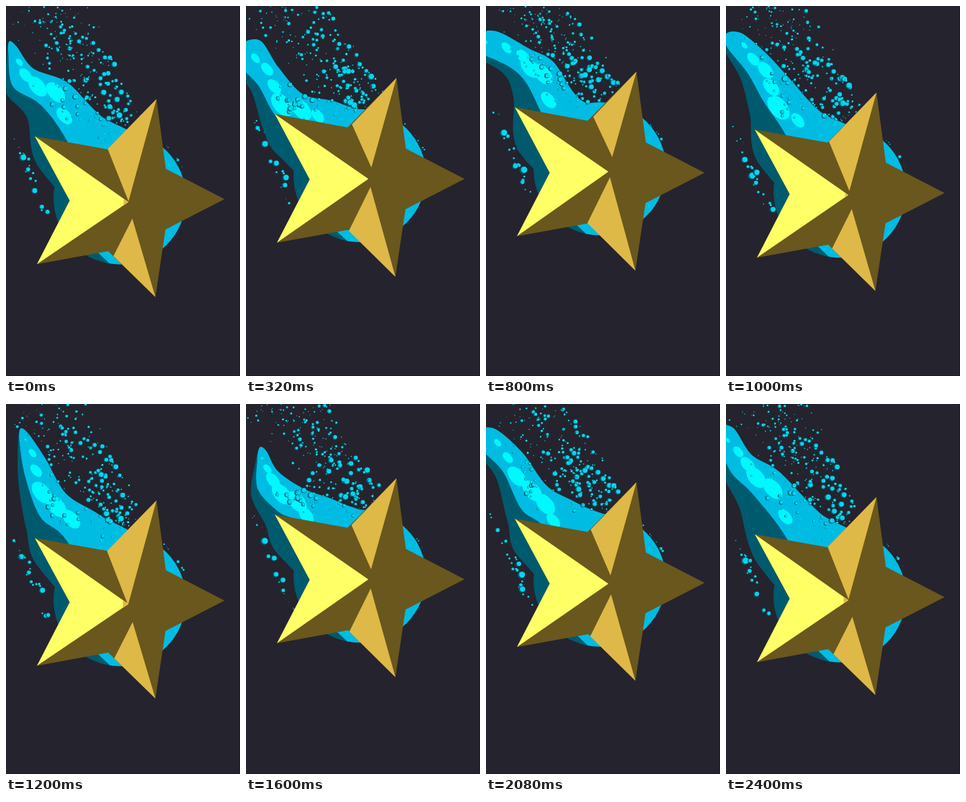
Animation of 325 by 512 pixels, one loop 2440 ms. Source, as an HTML page with a canvas:

```html
<!DOCTYPE html>
<html>
<head>
<meta charset="utf-8">
<style>
html, body { margin: 0; width: 100%; height: 100%; overflow: hidden; background: #25232e; }
canvas { display: block; width: 325px; height: 512px; }
</style>
</head>
<body>
<canvas id="stage" width="325" height="512"></canvas>
<script>
const ctx = document.getElementById('stage').getContext('2d');
const LOOP = 2440, STEP = 40;
const BG = '#25232e', DEEP = '#005a6e', WATER = '#00bce3', GLOW = '#00f8ff';
const DARK = '#69571d', TAN = '#dfb947', YELLOW = '#ffff66';

const lerp = (a, b, u) => a + (b - a) * u;
const bump = u => Math.sin(Math.PI * u);

let seed = 7;
function rnd() {
  seed = (seed * 16807) % 2147483647;
  return seed / 2147483647;
}

// Star height: half cosines between the turning points [time, y].
const turns = [[-20, 267.4], [610, 217.5], [1190, 272], [1800, 233], [2420, 267.4], [3050, 217.5]];
function bob(t) {
  const i = turns.findIndex(p => p[0] > t);
  const [t0, a] = turns[i - 1], [t1, b] = turns[i];
  return lerp(a, b, (1 - Math.cos(Math.PI * (t - t0) / (t1 - t0))) / 2);
}

// Centre line of the water tail: bend, neck and tip, and the half width of the tip.
const sways = [
  { time: 0, line: [57, 130, 19, 103, 8, 62], tip: 9 },
  { time: 320, line: [52, 147, 26, 101, 0, 65], tip: 26 },
  { time: 800, line: [66, 102, 42, 76, -4, 50], tip: 23 },
  { time: 1200, line: [56, 149, 36, 92, 24, 48], tip: 10 },
  { time: 1600, line: [55, 143, 26, 110, 21, 72], tip: 10 },
  { time: 2080, line: [58, 139, 32, 84, -2, 48], tip: 20 },
  { time: 2400, line: [46, 118, 17, 87, -2, 45], tip: 17 }
];
const ACROSS = { x: .75, y: -.66 };
const FLOW_ANGLE = .85;
const SHADE = [.05, .3, .5, .7];

function tailSpine(t, y) {
  const i = sways.findLastIndex(s => s.time <= t);
  const a = sways[i], b = sways[(i + 1) % sways.length];
  const u = (t - a.time) / ((b.time || LOOP) - a.time);
  const [x1, y1, x2, y2, x3, y3] = a.line.map((v, k) => lerp(v, b.line[k], u));
  return [
    { x: 89, y: 178 + .6 * (y - 250), w: 56 },
    { x: x1, y: y1, w: 37 },
    { x: x2, y: y2, w: 25 },
    { x: x3, y: y3, w: lerp(a.tip, b.tip, u) }
  ];
}

// Point s stations up the spine, pushed aside by a share of the width there.
function onSpine(spine, s, aside) {
  const i = Math.min(Math.floor(s), spine.length - 2), u = s - i;
  const mix = key => lerp(spine[i][key], spine[i + 1][key], u);
  const w = mix('w');
  return { x: mix('x') + ACROSS.x * w * aside, y: mix('y') + ACROSS.y * w * aside, w };
}

// Closed smooth curve through points.
function smooth(points) {
  const n = points.length, path = new Path2D(), at = i => points[(i + n) % n];
  path.moveTo(points[0].x, points[0].y);
  for (let i = 0; i < n; i++) {
    const near = k => at(i)[k] + (at(i + 1)[k] - at(i - 1)[k]) / 6.5;
    const far = k => at(i + 1)[k] - (at(i + 2)[k] - at(i)[k]) / 6.5;
    path.bezierCurveTo(near('x'), near('y'), far('x'), far('y'), at(i + 1).x, at(i + 1).y);
  }
  return path;
}

function tailShape(spine, y, lowerShare) {
  const [, , neck, end] = spine;
  const upper = spine.map((p, i) => onSpine(spine, i, 1));
  const lower = spine.map((p, i) => onSpine(spine, i, -lowerShare(i)));
  const tip = { x: lerp(neck.x, end.x, 1.32), y: lerp(neck.y, end.y, 1.32) };
  return smooth([...upper.reverse(), { x: 200, y: y - 66 }, { x: 150, y: y + 50 }, ...lower, tip]);
}

function circle(x, y, r, color) {
  ctx.fillStyle = color;
  ctx.beginPath();
  ctx.arc(x, y, r, 0, 7);
  ctx.fill();
}

function trace(points) {
  ctx.beginPath();
  for (const [x, y] of points) ctx.lineTo(x, y);
}

function poly(color, ...points) {
  ctx.fillStyle = color;
  trace(points);
  ctx.fill();
}

const glints = Array.from({ length: 6 }, (_, i) => ({
  phase: i / 6, aside: .1 + .45 * rnd(), size: .3 + .16 * rnd()
}));

function drawWater(t, y, spine) {
  const discY = y - 4.5 + .1 * (y - 240);
  ctx.fillStyle = DEEP;
  ctx.fill(tailShape(spine, y, () => 1));
  circle(158, discY, 92, DEEP);

  ctx.save();
  trace([[95, y - 100], [330, y - 100], [330, y + 95], [150, y + 95], [95, y + 43]]);
  ctx.clip();
  circle(158, discY, 92, WATER);
  ctx.restore();

  const lit = tailShape(spine, y, i => SHADE[i]);
  ctx.save();
  ctx.fillStyle = WATER;
  ctx.fill(lit);
  ctx.clip(lit);
  ctx.fillStyle = GLOW;
  for (const g of glints) {
    const u = (t / LOOP * 3 + g.phase) % 1;
    const p = onSpine(spine, u * 3, g.aside);
    const r = p.w * g.size * Math.sqrt(bump(u));
    ctx.beginPath();
    ctx.ellipse(p.x, p.y, r * 1.25, r * .75, FLOW_ANGLE, 0, 7);
    ctx.fill();
  }
  ctx.restore();
}

// Each zone places a droplet from its life u; r is the size factor.
const zones = {
  trail(d, u, y) {
    const spread = d.side * lerp(40, 66, u);
    return {
      x: lerp(168, 42, u) + ACROSS.x * spread,
      y: lerp(155, -16, u) + ACROSS.y * spread + (y - 250) * (1 - u),
      r: Math.min(1, u * 12) * (1.05 - .6 * u)
    };
  },
  body(d, u, y, spine) {
    const p = onSpine(spine, u * 2, .45 + d.side * .5);
    return { x: p.x, y: p.y, r: bump(u) * 1.1 };
  },
  below(d, u, y) {
    return { x: lerp(70, 10, u) + d.side * 18, y: lerp(y + 55, y - 95, u) + d.side * 25, r: bump(u) * 1.3 };
  },
  right(d, u, y) {
    return { x: 238 - u * 14 + d.side * 26, y: y - 52 - u * 22 + d.side * 34, r: bump(u) * .8 };
  }
};

const spray = (zone, count) => Array.from({ length: count }, () => ({
  zone, phase: rnd(), cycles: 2 + Math.floor(rnd() * 2),
  side: rnd() + rnd() - 1, size: 1.1 + 3.7 * rnd() ** 2.6
}));
const drops = [...spray('trail', 260), ...spray('body', 32), ...spray('below', 24), ...spray('right', 8)];

function drawDrops(t, y, spine) {
  for (const d of drops) {
    const u = (t / LOOP * d.cycles + d.phase) % 1;
    const p = zones[d.zone](d, u, y, spine), r = p.r * d.size;
    if (r < .3) continue;
    if (r > 1) circle(p.x, p.y, r, DEEP);
    circle(p.x + r * .25, p.y - r * .1, r * .82, r > 2 ? '#00d8f0' : '#00ebf5');
  }
}

// Vertices shift with k, the height off the vanishing line.
function drawStar(y) {
  const k = y - 240;
  const at = (x, dy, dx = 0, slope = 0) => [x + dx * k, y + dy + slope * k];
  const top = at(209, -139.7, 0, .04), bottom = at(207.5, 135.5);
  const upperLeft = at(40, -89.7, 0, .1), lowerLeft = at(43, 88.3, 0, .06);
  const notch = at(88.5, .6, 0, .05), heart = at(170, 0, 0, .15);

  poly(DARK, top, at(222, -42), at(303.5, 0), at(221.5, 42), bottom,
    at(142, 70.5, 0, .05), lowerLeft, notch, upperLeft, at(141, -71.3, 0, .08));
  poly(TAN, top, at(147, -75.5, -.21, .22), at(174, -15.5, -.14, .68));
  poly(TAN, bottom, at(143, 72, .23, .25), at(173, 11.5, .09, .57));
  poly(YELLOW, upperLeft, heart, lowerLeft, notch);
  if (k > 15) poly(TAN, heart, at(170, 0, -.24, -.02), at(170, 0, -.24, .31));
}

function draw(t) {
  const y = bob(t), spine = tailSpine(t, y);
  ctx.fillStyle = BG;
  ctx.fillRect(0, 0, 325, 512);
  drawWater(t, y, spine);
  drawDrops(t, y, spine);
  drawStar(y);
  ctx.fillStyle = '#1b1a22';
  ctx.fillRect(324, 0, 1, 512);
  ctx.fillRect(0, 511, 325, 1);
}

const start = performance.now();
function tick() {
  const t = (performance.now() - start) % LOOP;
  draw(Math.floor(t / STEP) * STEP);
  requestAnimationFrame(tick);
}
tick();
</script>
</body>
</html>
```
